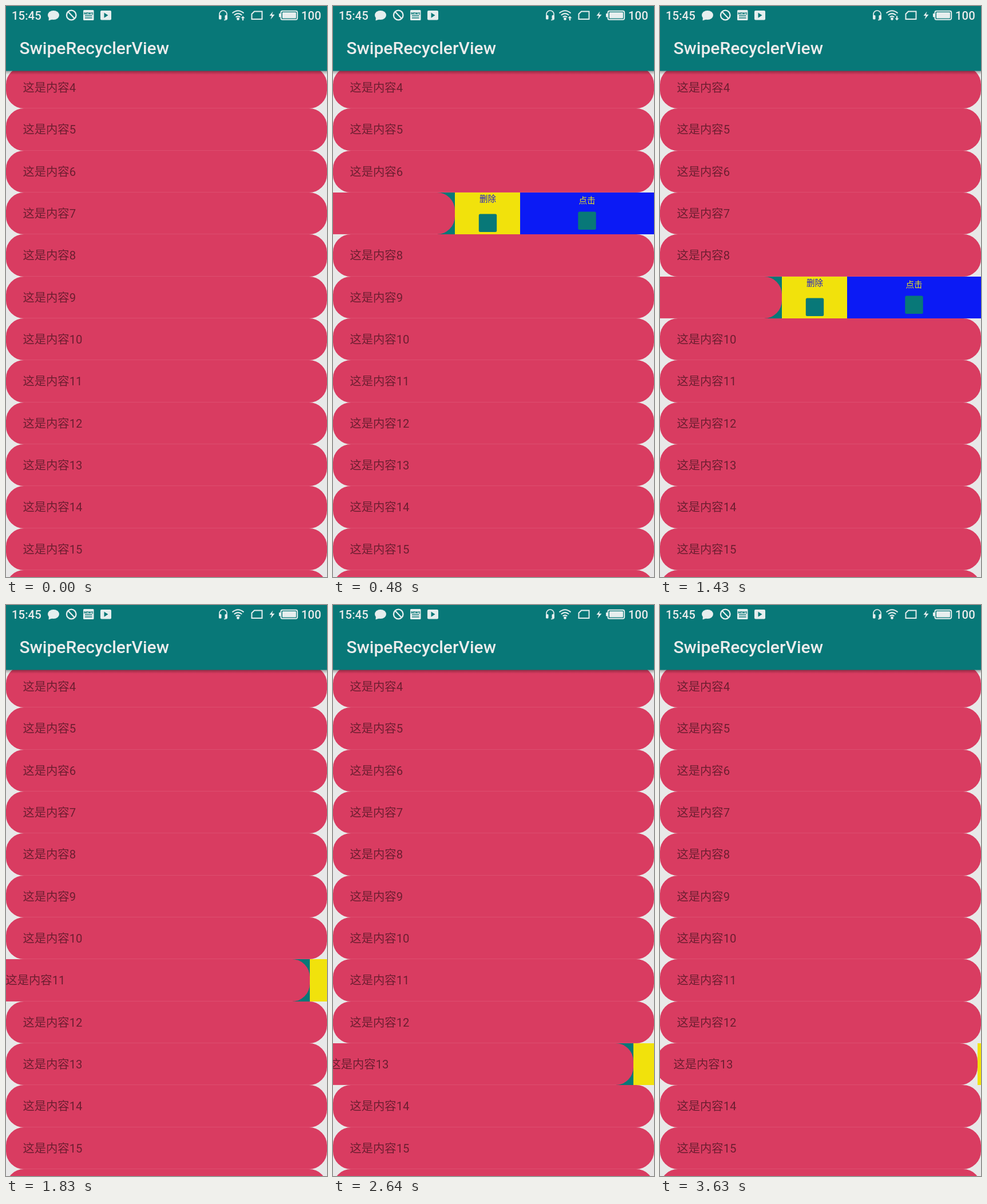
These frames come from a looping animation (561x998 px, 3.76 s). An HTML page:

```html
<!DOCTYPE html>
<html lang="zh-CN">
<head>
<meta charset="utf-8">
<title>SwipeRecyclerView</title>
<style>
  html, body { margin: 0; width: 100%; height: 100%; overflow: hidden; background: #e8e8e8; }
  svg { display: block; width: 561px; height: 998px; }
  text { font-family: Roboto, "Noto Sans CJK SC", "Noto Sans CJK", sans-serif; }
  .card { fill: #d93c61; }
  .label { font-size: 20.3px; fill: rgba(0, 0, 0, .5); }
  .line { fill: rgba(255, 255, 255, .09); }
  .act { font-size: 14.5px; text-anchor: middle; }
  .teal { fill: #087878; }
  .bar text { fill: #ececec; font-weight: 500; }
  .icons { fill: #e6eeee; }
  .stroke { fill: none; stroke: #e6eeee; stroke-width: 2; }
</style>
</head>
<body>
<svg viewBox="0 0 561 998">
  <defs>
    <linearGradient id="shade" x2="0" y2="1">
      <stop stop-color="#000" stop-opacity=".32"/>
      <stop offset="1" stop-color="#000" stop-opacity="0"/>
    </linearGradient>
  </defs>
  <g id="list"></g>
  <rect y="113" width="561" height="7" fill="url(#shade)"/>
  <g class="bar">
    <rect class="teal" width="561" height="113.5"/>
    <text x="23.4" y="84" font-size="30">SwipeRecyclerView</text>
    <text x="10" y="24" font-size="20.4">15:45</text>
    <text x="516" y="24" font-size="20.4">100</text>
  </g>
  <g class="icons">
    <ellipse cx="83" cy="16" rx="10" ry="8"/>
    <path d="M75 19 L74.500 25.500 L82 23Z"/>
    <rect x="135" y="7" width="18.500" height="18" rx="1.500"/>
    <text class="teal" x="144.200" y="14.500" font-size="6" font-weight="900" text-anchor="middle">NEWS</text>
    <path class="teal" d="M138 16.500h12.500v1.500h-12.500zM138 20h12.500v1.500h-12.500z"/>
    <rect x="165" y="8" width="19" height="16.500" rx="2"/>
    <path class="teal" d="M171.500 11.800v9l7-4.500z"/>
    <rect x="372" y="16" width="4.500" height="7.500" rx="1.500"/>
    <rect x="382.500" y="16" width="4.500" height="7.500" rx="1.500"/>
    <circle cx="405.500" cy="22.500" r="2.400"/>
    <path d="M466.500 9.500l-6 7.500h4l-2 6.500 7-8.500h-4.500z"/>
    <rect x="483" y="11" width="24" height="10.500" rx="1"/>
    <rect x="477" y="13" width="3" height="6.500" rx="1"/>
    <path id="up" d="M414 17.500l3.500 3.700h-2.400v4h-2.200v-4h-2.400z"/>
    <path id="down" d="M414 25.200l3.500-3.700h-2.400v-4h-2.200v4h-2.400z"/>
  </g>
  <g class="stroke">
    <circle cx="114.200" cy="16" r="8.300" stroke-width="2.300"/>
    <path d="M109 10.500l10.500 11" stroke-width="2.300"/>
    <path d="M373 17v-2.500a6.500 6.500 0 0 1 13 0v2.500M386 22q0 2.500-5 2.500" stroke-width="1.600"/>
    <path d="M395.500 12.500q10-8.500 20 0M398.700 16q6.800-5.800 13.600 0M401.700 19.500q3.800-3.200 7.600 0"/>
    <path d="M434 9.500h13.500v13.500h-18v-9z"/>
    <rect x="480.500" y="8.700" width="28.700" height="15" rx="2.500"/>
  </g>
</svg>
<script>
const LOOP = 3760, WIDTH = 561, OPEN = 348, FIRST = 4, LAST = 16;

// row, first step, last step, number of steps, offset from, offset to
const moves = [
  [7, 70, 480, 6, 30, OPEN],
  [7, 940, 940, 1, 0, 0],
  [9, 940, 1430, 8, 39, OPEN],
  [9, 1690, 1690, 1, 0, 110],
  [9, 1770, 1770, 1, 0, 0],
  [11, 1770, 2240, 7, 30, 345],
  [11, 2370, 2370, 1, 0, OPEN],
  [11, 2570, 2570, 1, 0, 0],
  [13, 2570, 2970, 5, 36, 342],
  [13, 3100, 3100, 1, 0, OPEN],
  [13, 3500, 3630, 2, 110, 6]
];

const top_ = n => Math.round(326 + (n - 7) * 73.333);

function action(x, width, color, ink, label, textY, iconY, height) {
  const mid = x + (width === 114 ? 57.5 : 117);
  return `<rect x="${x}" width="${width}" height="${height}" fill="${color}"/>
    <text class="act" x="${mid}" y="${textY}" fill="${ink}">${label}</text>
    <rect class="teal" x="${mid - 15.7}" y="${iconY}" width="31.4" height="31.4" rx="2.5"/>`;
}

function row(n) {
  const y = top_(n), h = top_(n + 1) - y;
  return `<g transform="translate(0 ${y})">
    <rect id="back${n}" class="teal" width="${WIDTH}" height="${h}" visibility="hidden"/>
    <g id="row${n}">
      <rect class="card" width="${WIDTH}" height="${h}" rx="31.2"/>
      <rect class="line" x="30" y="${h - 1}" width="501" height="1"/>
      <text class="label" x="29.5" y="44.3">这是内容${n}</text>
      ${action(WIDTH, 114, "#f1e20c", "#1d1bd0", "删除", 15.5, 37.5, h)}
      ${action(WIDTH + 114, 234, "#0b1af5", "#ece51c", "点击", 19, 33.5, h)}
    </g></g>`;
}

let html = "";
for (let n = FIRST; n <= LAST; n++) html += row(n);
const $ = id => document.getElementById(id);
$("list").innerHTML = html;

// Finger drag that eases into the settled position
function ease(p) {
  const q = Math.pow(p, .8);
  return q * q * (3 - 2 * q);
}

function offset([, start, end, steps, from, to], t) {
  if (steps === 1 || t >= end) return to;
  const k = Math.floor((t - start) / (end - start) * (steps - 1));
  return from + (to - from) * ease(k / (steps - 1));
}

const show = (id, on) => $(id).setAttribute("visibility", on ? "visible" : "hidden");

function draw(t) {
  const at = { 7: 0, 9: 0, 11: 0, 13: 0 };
  for (const m of moves) if (t >= m[1]) at[m[0]] = offset(m, t);
  for (const n in at) {
    $("row" + n).setAttribute("transform", `translate(${-Math.round(at[n])} 0)`);
    show("back" + n, at[n] > 20);
  }
  show("up", t < 1430);
  show("down", t >= 1430 && t < 1690);
}

let begin;
function tick(now) {
  begin ??= now;
  draw((now - begin) % LOOP);
  requestAnimationFrame(tick);
}
draw(0);
requestAnimationFrame(tick);
</script>
</body>
</html>
```
